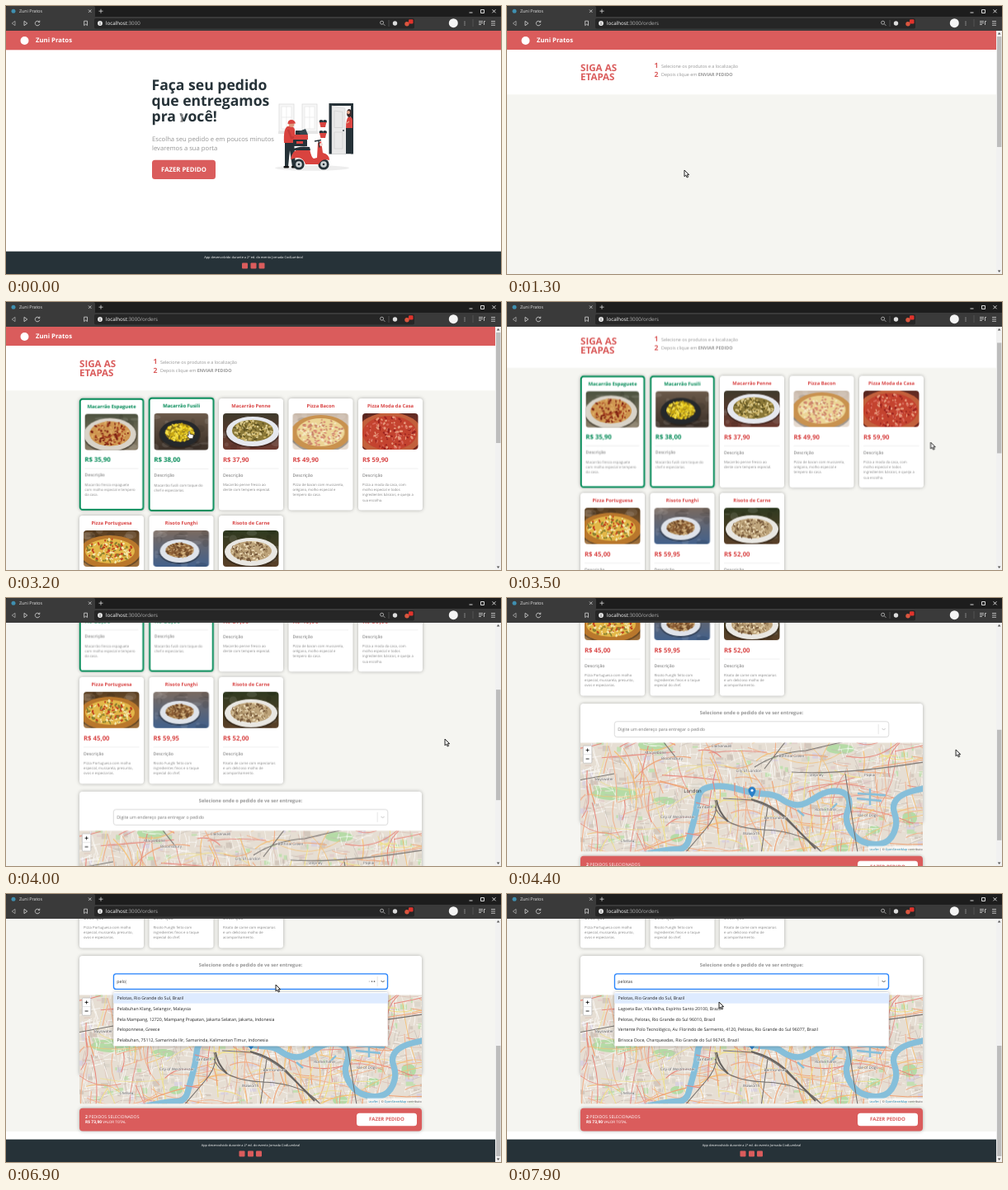
These frames come from a looping animation (600 by 325 pixels, 8 s). An HTML page:

```html
<!DOCTYPE html>
<html lang="pt-BR">
<head>
<meta charset="utf-8">
<title>Zuni Pratos</title>
<style>
  html, body { margin: 0; width: 100%; height: 100%; overflow: hidden; background: #fff; }
  svg { display: block; width: 600px; height: 325px; font-family: 'Open Sans', 'Noto Sans', sans-serif; text-rendering: geometricPrecision; }
  .shadow { filter: drop-shadow(0 .8px 2px rgba(0, 0, 0, .3)); }
  .card { transform-origin: 39px 67px; }
  .scroll { animation: scroll 8s linear infinite; }
  .thumb { animation: thumb 8s linear infinite; }
  .cursor { animation: cursor 8s linear infinite; }
  .dot { animation: pulse 1s ease-in-out infinite; }
  @keyframes scroll {
    0%, 42.5% { transform: translateY(0); }
    50% { transform: translateY(-163px); }
    57.5%, 100% { transform: translateY(-323px); }
  }
  @keyframes thumb {
    0%, 42.5% { transform: translateY(0); }
    50% { transform: translateY(74px); }
    57.5%, 100% { transform: translateY(147px); }
  }
  @keyframes pulse { 0%, 80%, 100% { opacity: 0; } 40% { opacity: 1; } }
  @keyframes cursor {
    0% { transform: translate(213px, 136px); }
    5% { transform: translate(214px, 160px); }
    11.25%, 16.25% { transform: translate(215px, 199px); }
    25%, 27.5% { transform: translate(213px, 170px); }
    31.25% { transform: translate(130px, 165px); }
    35% { transform: translate(212px, 160px); }
    40% { transform: translate(221px, 157px); }
    44%, 52.5% { transform: translate(532px, 171px); }
    58.75%, 61.25% { transform: translate(562px, 203px); }
    63.75%, 68.75% { transform: translate(315px, 95px); }
    70%, 92.5% { transform: translate(327px, 110px); }
    93.75%, 96.25% { transform: translate(300px, 120px); }
    98.75%, 100% { transform: translate(257px, 131px); }
  }
</style>
</head>
<body>
<svg id="stage" viewBox="0 0 600 325"></svg>
<script>
const LOOP = 8000;
const RED = '#da5c5c', INK = '#d94545', NAVY = '#263238', GREY = '#959595', GREEN = '#008a56';
const BRAND = 'Zuni Pratos';

const random = seed => () => (seed = seed * 16807 % 2147483647) / 2147483647;
const many = (n, make) => Array.from({ length: n }, (_, i) => make(i)).join('');
const text = (x, y, s, size, fill, weight = 400, anchor = 'start') =>
  `<text x="${x}" y="${y}" font-size="${size}" fill="${fill}" font-weight="${weight}" text-anchor="${anchor}">${s}</text>`;
const rect = (x, y, w, h, fill, r = 0, more = '') =>
  `<rect x="${x}" y="${y}" width="${w}" height="${h}" rx="${r}" fill="${fill}" ${more}/>`;
const circle = (x, y, r, fill, more = '') => `<circle cx="${x}" cy="${y}" r="${r}" fill="${fill}" ${more}/>`;
const ellipse = (x, y, rx, ry, fill, more = '') =>
  `<ellipse cx="${x}" cy="${y}" rx="${rx}" ry="${ry}" fill="${fill}" ${more}/>`;
const path = (d, fill, more = '') => `<path d="${d}" fill="${fill}" ${more}/>`;
const line = (d, color, width = 1, more = '') =>
  path(d, 'none', `stroke="${color}" stroke-width="${width}" ${more}`);
const group = (x, y, body, more = '') => `<g transform="translate(${x} ${y})" ${more}>${body}</g>`;
// Marks a part as visible only between two times.
const during = (from, to, body) => `<g data-from="${from}" data-to="${to}">${body}</g>`;
// Smooth path: each point bends the line, which passes through the midpoints.
const smooth = pts => `M${pts[0]}` + pts.slice(1, -1).map(([x, y], i) => {
  const [nx, ny] = pts[i + 2];
  return `Q${x} ${y} ${(x + nx) / 2} ${(y + ny) / 2}`;
}).join('') + `L${pts[pts.length - 1]}`;

function browser() {
  const chip = '#d8d8d8';
  return rect(0, 0, 600, 13, '#1d1d1d') + rect(0, 0, 108, 14, '#3a3a3a', 2) + rect(0, 13, 600, 17, '#3a3a3a') +
    circle(9, 6.3, 2.5, '#3f8fb0') + text(16, 8.3, BRAND, 5.3, '#e6e6e6') +
    line('M100 4.5l3.4 3.4m0-3.4l-3.4 3.4', chip, .8) + line('M115 3.7v5m-2.5-2.5h5', chip, .8) +
    line('M561.5 8h4M575.5 4.5h4v4h-4zM589.5 4.3l4 4m0-4l-4 4', '#eee', .9) +
    line('M11 18.3l-3.8 2.7l3.8 2.7z', '#aaa', .8) + line('M22 18.3l3.8 2.7l-3.8 2.7z', chip, .8) +
    line('M40.4 19.4a2.8 2.8 0 1 0 .4 2.4M40.8 17.6v2h-2', chip, .8) +
    line('M94.7 18.2h3.8v5.4l-1.9-1.5l-1.9 1.5z', chip, .8) +
    rect(107, 15, 388, 12.5, '#262626', 2) + circle(114, 21, 2.9, '#eee') +
    line('M114 20.7v2m0-3.4v.8', '#222', .8) +
    `<text x="121" y="23.1" font-size="6.2" fill="#b4b4b4"><tspan fill="#fff">localhost</tspan>:3000` +
    `<tspan data-from="1300" data-to="${LOOP}">/orders</tspan></text>` +
    line('M457.4 21.8l2 2', chip, .7) + circle(455.6, 20.2, 2, 'none', `stroke="${chip}" stroke-width=".7"`) +
    line('M464 17v8', '#666', .6) + circle(471.5, 21, 2.7, '#dcdcdc') + circle(486, 21.8, 2.7, '#d9563f') +
    rect(488, 16.3, 5.5, 5.2, '#e0332c', 1.2) + circle(542.3, 20.7, 5.5, '#f4f4f4') +
    circle(556, 19, .6, chip) + circle(556, 21, .6, chip) + circle(556, 23, .6, chip) + line('M566 16v9', '#666', .6) +
    line('M573 18.5h5m-5 2h5m-5 2h3m3.5-4v4.5m0-4.5h1.5', chip, .8) + line('M588 18.5h5m-5 2.4h5m-5 2.4h5', chip, .8);
}

const topBar = () => rect(0, 30, 600, 23.3, RED) + circle(22.5, 42, 5, '#fff') + text(36, 44.4, BRAND, 7.75, '#fff', 700);

const footer = cx => rect(0, 297.6, 600, 28, NAVY) +
  text(cx, 306.2, 'App desenvolvido durante a 2ª ed. do evento Jornada CodLumbral', 3.9, '#fff', 400, 'middle') +
  [-10.5, 0, 10].map(dx => rect(cx + dx - 3.5, 311.5, 7, 7, RED, 1)).join('');

function delivery() {
  const win = x => rect(x, 119, 18, 33, '#f7f7f7', 0, 'stroke="#dcdcdc" stroke-width=".8"') +
    rect(x + 3, 122, 12, 27, '#fff', 0, 'stroke="#e2e2e2" stroke-width=".6"') +
    line(`M${x + 9} 122v27m-6-14h12`, '#e2e2e2', .6) + rect(x - 1, 152, 20, 3, '#e6e6e6');
  const pot = y => ellipse(382, y - 2, 2.5, 2, NAVY) + ellipse(386.5, y - 2, 2.5, 2, NAVY) +
    path(`M380 ${y - 1}h8.4l-1.4 6h-5.6z`, '#d9433f');
  const wheel = x => circle(x, 192, 6.6, NAVY) + circle(x, 192, 3.8, '#cfd4d6') + circle(x, 192, 1.3, NAVY);
  return ellipse(371, 196.5, 45, 3.2, '#ededed') + win(331) + win(359) + pot(142) + pot(155) +
    rect(391.5, 118, 29.5, 61.5, NAVY) + rect(395, 121, 23, 58.5, '#fafafa') +
    path('M395 121l16 3v55.5h-16z', '#e9e9e9', 'stroke="#cfcfcf" stroke-width=".5"') +
    line('M398 127l10 1.5v19h-10zM398 153h10v20h-10z', '#cfcfcf', .7) + circle(409, 151, .9, NAVY) +
    path('M412 149q0-14 4-15q3 0 4 4v11z', '#d9433f') + rect(412, 148, 8, 31, NAVY) +
    ellipse(416, 130, 3, 5, '#3a2a2c') + circle(415, 129, 2, '#e9ab91') + line('M413 142l3-2', '#e9ab91', 1.4) +
    path('M338 164h11l1 14l1 17h-4l-3-20l-2 20h-4z', NAVY) + rect(336.5, 194, 6.5, 2.4, '#111', 1) + rect(346, 194, 6.5, 2.4, '#111', 1) +
    path('M337 166q-1-17 4-20q8-1 9 4l1 16z', '#d9433f') + line('M342 150l4 10l9-2', '#c53a37', 2.4) +
    circle(346, 143.5, 3.4, '#e0987c') + path('M341.5 143q0-5 4.5-5q4 0 5 4.5z', '#d9433f') +
    rect(351, 151, 12, 5, NAVY, .6) + rect(349, 156, 17, 6, '#d9433f', .6) + rect(348, 162, 17, 8, NAVY, .6) +
    rect(352, 164, 8, 3, '#d9433f') + path('M355 152l8-3l3 7h-9z', '#33444c') +
    wheel(355) + wheel(385) +
    path('M345 186q2-12 12-13h11q2 11 5 12l4-1l1-18l4-2l2 14q8 2 8 9q-9-3-13 5h-16q-3-9-11-8q-3 1-7 2z', '#d9433f') +
    path('M347 174q8-5 21-3l1 4h-21z', NAVY) + line('M374 164l8-1.5m-3 1l1 8', NAVY, 1.4) + circle(382, 168, 2, '#f3d7d2');
}

function home() {
  return rect(0, 30, 600, 295, '#fff') + topBar() +
    ['Faça seu pedido', 'que entregamos', 'pra você!'].map((s, i) => text(176.5, 102 + 19 * i, s, 17.6, NAVY, 700)).join('') +
    text(177, 163.8, 'Escolha seu pedido e em poucos minutos', 7.68, GREY) +
    text(177, 174.6, 'levaremos a sua porta', 7.68, GREY) +
    rect(177, 186.8, 77, 23.2, RED, 3.5) + text(215.5, 201.2, 'FAZER PEDIDO', 7.75, '#fff', 700, 'middle') +
    delivery() + footer(300) +
    during(600, 1300, rect(-3, 314.5, 75, 13, '#3a3a3a', 2) + text(4, 322, 'localhost:3000/orders', 5.3, '#e0e0e0'));
}

const products = [
  { name: 'Macarrão Espaguete', price: '35,90', about: 'Macarrão fresco espaguete|com molho especial e tempero|da casa.',
    bg: ['#4d5340', '#8a7d68'], plate: '#d9d3c8', food: '#cf9650', bits: ['#7e2012', '#a5401f', '#e0b068'], cx: 32, cy: 24, rx: 26, ry: 15 },
  { name: 'Macarrão Fusili', price: '38,00', about: 'Macarrão fusili com toque do|chef e especiarias.',
    bg: ['#6b5a4a', '#3b3028'], plate: '#25282b', food: '#8a731d', bits: ['#efd21f', '#f6e04a', '#c9a814'], cx: 32, cy: 23, rx: 18, ry: 11 },
  { name: 'Macarrão Penne', price: '37,90', about: 'Macarrão penne fresco ao|dente com tempero especial.',
    bg: ['#3f3a2c', '#6d3a30'], plate: '#e6e8ee', food: '#8a7838', bits: ['#c9b064', '#5f5322', '#ddcd92'], cx: 36, cy: 21, rx: 25, ry: 13 },
  { name: 'Pizza Bacon', price: '49,90', about: 'Pizza de bacon com mussarela,|orégano, molho especial e|tempero da casa.',
    bg: ['#c9b9aa', '#e8ddd2'], plate: '#c9924f', food: '#ecd596', bits: ['#d98a72', '#f6ebc6', '#c9846a'], cx: 34, cy: 23, rx: 29, ry: 17 },
  { name: 'Pizza Moda da Casa', price: '59,90', about: 'Pizza a moda da casa, com|molho especial e todos|ingredientes básicos, e queijo a|sua escolha.',
    bg: ['#5f2a22', '#a33a2c'], plate: '#c2603c', food: '#c4432f', bits: ['#e59a7c', '#9c2420', '#d9685a'], cx: 33, cy: 24, rx: 33, ry: 21 },
  { name: 'Pizza Portuguesa', price: '45,00', about: 'Pizza Portuguesa com molho|especial, mussarela, presunto,|ovos e especiarias.',
    bg: ['#5a3f22', '#a0703a'], plate: '#b9772c', food: '#e3b748', bits: ['#c2401f', '#f5e7a8', '#8a8030'], cx: 32, cy: 25, rx: 30, ry: 15 },
  { name: 'Risoto Funghi', price: '59,95', about: 'Risoto Funghi feito com|ingredientes finos e o toque|especial do chef.',
    bg: ['#7a6a60', '#43618c'], plate: '#dfe3ea', food: '#a9804e', bits: ['#6b4526', '#d3b483', '#8a5c34'], cx: 32, cy: 24, rx: 17, ry: 9 },
  { name: 'Risoto de Carne', price: '52,00', about: 'Risoto de carne com especiarias|e um delicioso molho de|acompanhamento.',
    bg: ['#2f3a20', '#5a4028'], plate: '#e9e7e2', food: '#bda37a', bits: ['#ead9b6', '#76583a', '#a58a62'], cx: 34, cy: 25, rx: 25, ry: 12 },
];

function photo({ bg, plate, food, bits, cx, cy, rx, ry }, seed) {
  const rnd = random(seed * 977 + 31);
  const bit = i => {
    const a = rnd() * 6.28, r = Math.sqrt(rnd()) * .95;
    const x = cx + Math.cos(a) * rx * r, y = cy + Math.sin(a) * ry * r;
    return ellipse(x, y, .8 + rnd() * 1.7, .6 + rnd() * .9, bits[i % 3], `transform="rotate(${rnd() * 180} ${x} ${y})"`);
  };
  const blotch = i => ellipse(rnd() * 68, rnd() * 44, 2 + rnd() * 6, 1 + rnd() * 4, i % 2 ? '#000' : '#fff', 'opacity=".1"');
  return `<g clip-path="url(#photo)"><linearGradient id="tone${seed}" x2="0" y2="1">` +
    `<stop stop-color="${bg[0]}"/><stop offset="1" stop-color="${bg[1]}"/></linearGradient>` +
    rect(0, 0, 68, 44, `url(#tone${seed})`) + many(24, blotch) +
    ellipse(cx, cy + 2.5, rx + 8, ry + 5.5, '#000', 'opacity=".3"') + ellipse(cx, cy + 1, rx + 7, ry + 5, plate) +
    ellipse(cx, cy, rx, ry, food) + many(130, bit) + '</g>';
}

function card(p, i, height, chosen) {
  const ink = chosen ? GREEN : INK, d = chosen ? 1.4 : 0;
  const pic = `<g transform="translate(${5 + d} ${18 + d / 2}) scale(${1 - d / 34} 1)">${photo(p, i + 1)}</g>`;
  return rect(0, 0, 78, height, '#fff', 3.5, 'class="shadow"') +
    (chosen ? rect(.7, .7, 76.6, height - 1.4, 'none', 3, `stroke="${GREEN}" stroke-width="1.9"`) : '') +
    text(39, 11 + d / 2, p.name, 5.8, ink, 700, 'middle') + (chosen ? pic : during(1450 + i * 60, LOOP, pic)) +
    text(5 + d, 76.8, 'R$ ' + p.price, 7.75, ink, 700) + line(`M${5 + d} 85h${67.5 - 2 * d}`, '#e4e4e4', .6) +
    text(5 + d, 94.8, 'Descrição', 5.2, '#8c8c8c', 600) +
    p.about.split('|').map((s, n) => text(5 + d, 106 + 6.2 * n, s, 4.25, '#858585')).join('');
}

function cards() {
  const pickTime = [2500, 2800];
  return products.map((p, i) => {
    const low = i > 4, height = low ? 129.5 : 135.5, pick = pickTime[i];
    const body = pick
      ? during(0, pick, card(p, i, height)) + during(pick, LOOP, card(p, i, height, true))
      : card(p, i, height);
    return group(89 + 84.5 * (i % 5), low ? 259 : 117, `<g class="card" id="card${i}">${body}</g>`);
  }).join('');
}

function map() {
  const rnd = random(4242), px = () => 80 + rnd() * 430, py = () => 116 + rnd() * 142;
  const street = (len, bend) => {
    const a = -.4 + rnd() * .7 + (rnd() < .5 ? 1.57 : 0), c = Math.cos(a) * len, s = Math.sin(a) * len, k = (rnd() - .5) * bend;
    return `M${px()} ${py()}q${c / 2 - s * k} ${s / 2 + c * k} ${c} ${s}`;
  };
  const pick = list => list[rnd() * list.length | 0];
  const roads = ['#f0a070', '#e8877c', '#f5c074', '#efe08c', '#f2b08a'];
  const river = smooth([[150, 262], [195, 251], [217, 252], [223, 230], [230, 204], [232, 182], [245, 175], [268, 175], [298, 184], [325, 185],
    [340, 196], [356, 199], [371, 191], [387, 181], [409, 181], [417, 195], [409, 215], [421, 238], [442, 247], [464, 243],
    [474, 220], [466, 198], [479, 184], [508, 177]]);
  const park = (x, y, w, h) => ellipse(x, y, w, h, '#b5dba6');
  const places = [[180, 136, 'Marylebone'], [260, 128, 'Clerkenwell'], [293, 158, 'City of London'], [207, 214, 'City of Westminster'],
    [296, 234, 'Walworth'], [386, 205, 'Rotherhithe'], [325, 215, 'Bermondsey'], [437, 212, 'Isle of Dogs'], [118, 168, 'Bayswater'],
    [200, 143, 'Bloomsbury'], [345, 140, 'Bethnal Green'], [375, 163, 'Stepney'], [146, 243, 'Chelsea'], [240, 202, 'Lambeth'], [440, 163, 'Poplar']];
  return `<g clip-path="url(#map)">` + rect(89, 122, 415, 133, '#e6ded3') +
    many(380, () => rect(px(), py(), 2 + rnd() * 8, 2 + rnd() * 5, pick(['#d3c8bd', '#dcd6cb', '#c3dfb2', '#e3cfcb', '#d9d2de']))) +
    park(130, 184, 27, 8) + park(176, 125, 17, 8) + park(190, 193, 14, 5) + park(404, 130, 17, 6) + park(405, 250, 9, 6) +
    park(206, 238, 8, 5) + park(445, 228, 8, 5) + park(488, 214, 9, 8) +
    many(900, () => line(street(4 + rnd() * 22, .3), pick(['#fff', '#fbf8f2', '#c4bbb3', '#fff', '#d8b9ae']), .65)) +
    many(200, () => line(street(18 + rnd() * 75, .6), pick(roads), .7 + rnd() * .5)) +
    line(river, '#86bfda', 7.4, 'stroke-linejoin="round"') + line('M425 184l34 2M424 190l30 3M440 178v20M352 204l8 7M400 196l-8 8', '#86bfda', 2.4) +
    line('M229 195l16 4M250 170l2 12M276 171v15M287 175l1 14M307 178l-2 13M216 232l18 3', '#e8877c', 1.1) +
    line('M297 192q28 10 42 24t48 44M252 192q6 16-12 36l-24 28M300 152q28-18 62-20l60-14M262 190l36 2M130 160l-44 8M316 200l-8 58M345 158q60 4 160-12M410 160l15 96M252 200q10 26 60 28t70 28M190 122l16 20M340 118l-28 36', '#76726f', 1.1) +
    line('M296 191q24 6 42 22l36 38M254 192q2 14 14 26', '#66625f', 1.9) +
    places.map(([x, y, s]) => `<g stroke="#fff" stroke-opacity=".7" stroke-width=".9" paint-order="stroke">${text(x, y, s, 4.6, '#4d4a4a', 400, 'middle')}</g>`).join('') +
    text(225, 183, 'London', 6, '#333', 400, 'middle') +
    path('M297 188.5q-4.2-5.5-4.2-8.3a4.2 4.2 0 0 1 8.4 0q0 2.8-4.2 8.3z', '#2a81cb', 'stroke="#1f68a8" stroke-width=".5"') + circle(297, 180.2, 1.5, '#fff') +
    rect(438, 247.6, 66, 7, '#fff', 0, 'fill-opacity=".75"') +
    `<text x="439.5" y="252.6" font-size="3.6" fill="#444"><tspan fill="#0078a8">Leaflet</tspan> | © <tspan fill="#0078a8">OpenStreetMap</tspan> contributors.</text>` +
    rect(92.3, 126, 10.6, 21.2, '#fff', 1.3, 'stroke="#aaa" stroke-width=".6"') + line('M92.3 136.6h10.6', '#ccc', .5) +
    line('M95.6 131.4h4m-2-2v4M95.6 142h4', '#111', .9) + '</g>';
}

function menu(from, to, rows) {
  const single = rows.length === 1, h = single ? 17 : 65.5;
  return during(from, to, rect(130.3, 119, 332.5, h, '#fff', 1.5, 'class="shadow"') + (single
    ? text(296.5, 129.4, rows[0], 5.25, '#999', 400, 'middle')
    : rect(130.3, 120.2, 332.5, 12.5, '#deebff') + rows.map((s, i) => text(134.5, 128.2 + 12.7 * i, s, 5.28, '#222')).join('')));
}

function search() {
  const word = 'pelotas', start = 6580, y = 108;
  const caret = '<tspan dx="-.9" font-weight="300">|</tspan>';
  const typed = many(word.length, i => {
    const from = start + i * 100, last = i === word.length - 1;
    const s = word.slice(0, i + 1);
    return during(from, last ? 7700 : from + 100, text(134.3, y, s + caret, 5.25, '#333')) +
      (last ? during(7700, LOOP, text(134.3, y, s, 5.25, '#333')) : '');
  });
  const dots = ['-.76', '-.6', '-.44'].map((delay, i) => circle(440.5 + 3 * i, 106, .85, '#444', `class="dot" style="animation-delay:${delay}s"`)).join('');
  return rect(130.3, 96.7, 332.5, 18.8, '#fff', 3, 'stroke="#ccc" stroke-width=".7"') +
    during(5500, LOOP, rect(130.5, 96.8, 332, 18.6, '#fff', 3, 'stroke="#2684ff" stroke-width="1.3"')) +
    during(0, start, text(134.3, y, 'Digite um endereço para entregar o pedido', 5.25, '#757575')) +
    during(5600, 6100, line('M134.2 103v6.5', '#333', .5)) + typed +
    line('M450.2 100v12', '#ccc', .5) + line('M454.6 105l2 2l2-2', '#bbb', .9) +
    during(5500, LOOP, line('M454.6 105l2 2l2-2', '#666', .9)) + during(start, 7700, dots) +
    menu(5600, start, ['No options']) + menu(start, 6800, ['Loading...']) +
    menu(6800, 7400, ['Pelotas, Rio Grande do Sul, Brazil', 'Pelabuhan Klang, Selangor, Malaysia',
      'Pela Mampang, 12720, Mampang Prapatan, Jakarta Selatan, Jakarta, Indonesia', 'Peloponnese, Greece',
      'Pelabuhan, 75112, Samarinda Ilir, Samarinda, Kalimantan Timur, Indonesia']) +
    menu(7400, LOOP, ['Pelotas, Rio Grande do Sul, Brazil', 'Lagoeta Bar, Vila Velha, Espírito Santo 20100, Brazil',
      'Pelotas, Pelotas, Rio Grande do Sul 96010, Brazil',
      'Vertente Polo Tecnológico, Av. Florindo de Sarmento, 4120, Pelotas, Rio Grande do Sul 96077, Brazil',
      'Brisoca Doce, Charqueadas, Rio Grande do Sul 96745, Brazil']);
}

const checkout = () => rect(89, 259.7, 415, 27.8, RED, 4, 'class="shadow"') +
  text(96, 271.8, '<tspan font-weight="700">2</tspan> PEDIDOS SELECIONADOS', 5.2, '#fff') +
  text(96, 278, '<tspan font-weight="700" font-size="4.95">R$ 73,90</tspan> VALOR TOTAL', 4.5, '#fff') +
  rect(425, 265.7, 73, 15.5, '#fff', 3.5) + text(461.5, 275.2, 'FAZER PEDIDO', 6.05, RED, 700, 'middle');

function orders() {
  const steps = rect(0, 53, 600, 54.3, '#fff') + text(89, 79.2, 'SIGA AS', 11.6, RED, 700) + text(89, 90.2, 'ETAPAS', 11.6, RED, 700) +
    text(178.5, 75.3, '1', 8.6, RED, 700) + text(178.5, 86, '2', 8.6, RED, 700) +
    text(187, 74.6, 'Selecione os produtos e a localização', 5.4, GREY) +
    text(187, 85.2, 'Depois clique em <tspan font-weight="700">ENVIAR PEDIDO</tspan>', 5.4, GREY);
  const bottom = rect(89, 75, 415, 145, '#fff', 3.5, 'class="shadow"') +
    text(296.5, 87.7, 'Selecione onde o pedido de ve ser entregue:', 5.75, GREY, 700, 'middle') +
    map() + search() + checkout();
  return rect(0, 30, 600, 295, '#f5f5f1') + `<g class="scroll">` + topBar() + steps + rect(0, 611, 600, 40, '#fff') +
    during(1400, LOOP, cards() + group(0, 323, bottom)) + group(0, 323, footer(296.5)) + '</g>' +
    rect(593, 30, 7, 295, '#f1f1f1') + path('M594.8 34.5h3.6l-1.8-2.4zM594.8 320.5h3.6l-1.8 2.4z', '#555') +
    rect(594, 37, 5.4, 134, '#bdbdbd', 0, 'class="thumb"');
}

function cursor() {
  const arrow = path('M0 0v7.8l1.8-1.6l1.4 2.8l1.4-.7l-1.3-2.6h2.4z', '#f4f4f4', 'stroke="#111" stroke-width=".9" stroke-linejoin="round"');
  const beam = line('M-1.6-4h3.2M0-4v8m-1.6 0h3.2', '#fff', 1.6) + line('M-1.6-4h3.2M0-4v8m-1.6 0h3.2', '#222', .8);
  const hand = path('M-.8 0q.9-.9 1.7 0v3l3.6.9q.8.3.6 1.4l-.7 3.2h-4.2l-2.7-3.3q.3-1.2 1.7-.2z', '#fff', 'stroke="#222" stroke-width=".6"');
  return '<g class="cursor">' + during(0, 400, beam) + during(400, 600, arrow) + during(600, 1300, hand) +
    during(1300, 1400, arrow) + during(1400, 3300, hand) + during(3300, LOOP, arrow) + '</g>';
}

const stage = document.getElementById('stage');
stage.innerHTML = `<defs>
  <clipPath id="page"><rect x="0" y="30" width="600" height="295"/></clipPath>
  <clipPath id="photo"><rect width="67.5" height="44" rx="4"/></clipPath>
  <clipPath id="map"><rect x="89" y="122.5" width="415" height="131.8"/></clipPath></defs>
  <g clip-path="url(#page)">${during(0, 1300, home())}${during(1300, LOOP, orders())}</g>${browser()}${cursor()}`;

// Holds each value until the next time in the list.
function hold(el, prop, list) {
  const frames = list.map(([t, v]) => ({ offset: t / LOOP, [prop]: v, easing: 'step-end' }));
  el.animate([...frames, { offset: 1, [prop]: list[list.length - 1][1] }], { duration: LOOP, iterations: Infinity });
}

stage.querySelectorAll('[data-from]').forEach(el => {
  const from = +el.dataset.from, to = +el.dataset.to;
  const prop = el.tagName === 'tspan' ? 'fillOpacity' : 'opacity';
  const list = from ? [[0, 0], [from, 1]] : [[0, 1]];
  if (to < LOOP) list.push([to, 0]);
  hold(el, prop, list);
});

const flat = 'scale(1)', raised = 'scale(1.016)';
hold(document.getElementById('card0'), 'transform', [[0, flat], [2350, raised], [2650, flat]]);
hold(document.getElementById('card1'), 'transform', [[0, flat], [1400, raised], [2350, flat], [2650, raised], [3300, flat]]);
</script>
</body>
</html>
```
